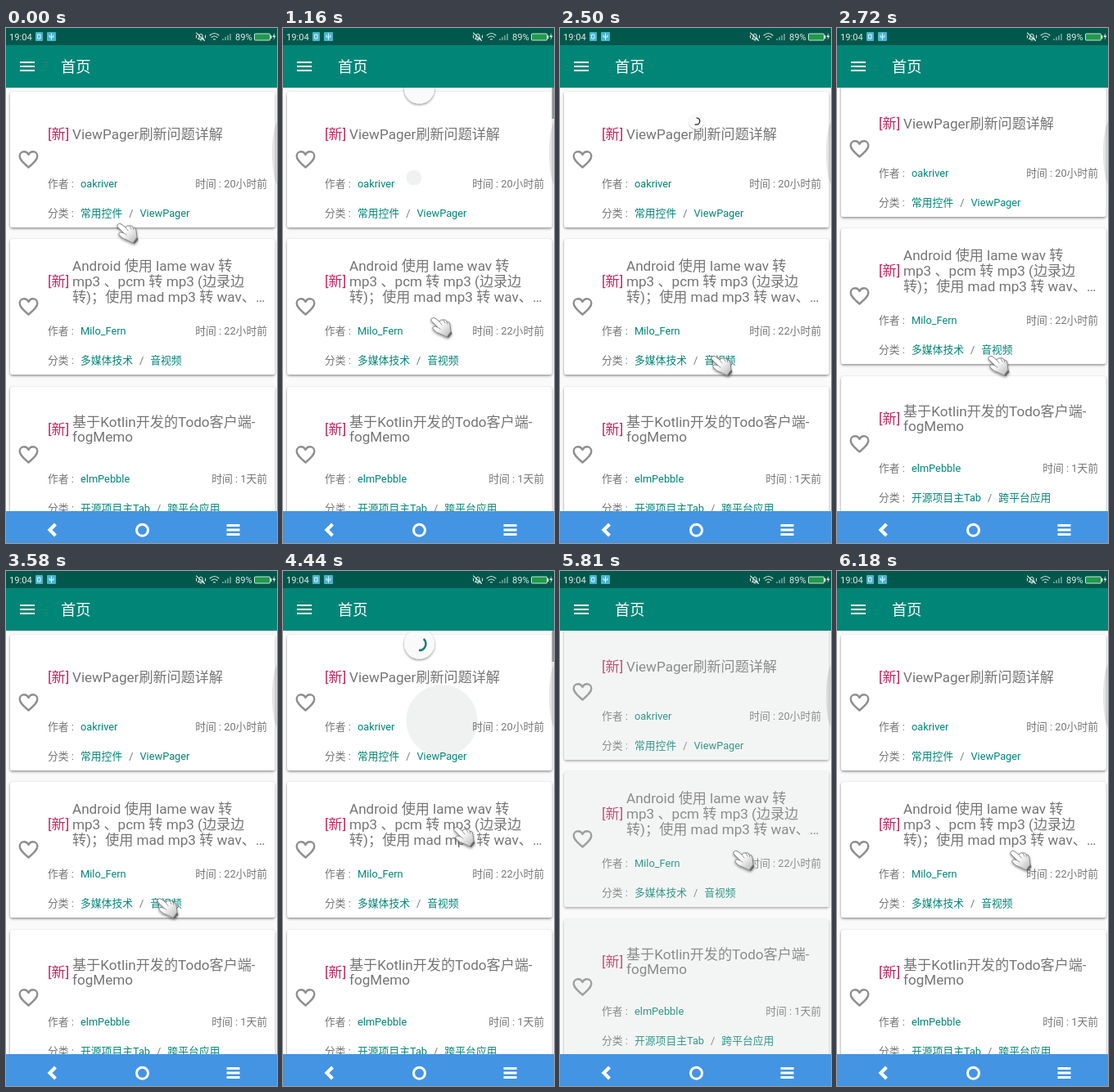
These frames come from a looping animation (331 by 630 pixels, 6570 ms). An HTML page:

```html
<!DOCTYPE html>
<html lang="zh-CN">
<head>
<meta charset="utf-8">
<title>首页</title>
<style>
  html, body { margin: 0; width: 100%; height: 100%; overflow: hidden; background: #fafafa; }
  svg { display: block; width: 100vw; height: 100vh; }
  text { font-family: Roboto, "Noto Sans CJK SC", "Noto Sans CJK", sans-serif; white-space: pre; }
  .title { font-size: 17.1px; fill: #757575; }
  .tag { font-size: 17.1px; fill: #c2285f; }
  .small { font-size: 12.8px; fill: #757575; }
  .link { fill: #008577; }
  .status { font-size: 11.2px; fill: #dceae7; }
  .line { fill: none; stroke-linecap: round; stroke-linejoin: round; }
</style>
</head>
<body>
<svg viewBox="0 0 331 630" preserveAspectRatio="none">
  <defs>
    <filter id="shade" x="-10%" y="-10%" width="120%" height="125%">
      <feDropShadow dx="0" dy="1.4" stdDeviation="1.5" flood-opacity=".46"/>
    </filter>
    <linearGradient id="glove" x1="0" y1="0" x2="1" y2="1">
      <stop offset=".4" stop-color="#fff"/><stop offset="1" stop-color="#b4b4b4"/>
    </linearGradient>
  </defs>
  <rect width="331" height="630" fill="#fafafa"/>
  <g id="list"></g>
  <circle id="ripple" cy="183" fill="#001410"/>
  <rect id="scroll" x="328.5" y="73" width="2.5" height="38" fill="#8f9492"/>
  <ellipse cx="333.5" cy="153" rx="8.5" ry="40" fill="#000" opacity=".1"/>
  <g id="spinner">
    <circle r="18.5" fill="#fafafa" filter="url(#shade)"/>
    <circle id="arc" r="8" class="line" stroke-width="2.5" style="stroke-linecap:butt"/>
  </g>

  <rect width="331" height="73" fill="#008577"/>
  <rect width="331" height="21" fill="#00574b"/>
  <text class="status" x="4" y="15">19:04</text>
  <g fill="#48b5cf">
    <rect x="36" y="5" width="9" height="11" rx="1"/>
    <rect x="50" y="5" width="11" height="11" rx="1"/>
  </g>
  <path class="line" stroke="#e4f4f4" d="M39 8h3v5h-3zM55.500 7v7M53 9v2h5v-2"/>
  <g class="line" stroke="#d5e5e2" stroke-width="1.1">
    <path d="M234.500 13.500h7l-1.500-2v-2.500q-2-3.500-4 0v2.500zM232.500 6l10 9.500M237 15h2M232.500 9v3M243.500 9v3"/>
    <path d="M249 9q5.500-5 11 0M251 11.500q3.500-3 7 0M253.500 14q1-1 2 0"/>
  </g>
  <path stroke="#7fa9a2" stroke-width="1.500" d="M265 15v-2M268 15v-4M271 15v-6M274 15v-8"/>
  <text class="status" x="280" y="15">89%</text>
  <rect x="303.500" y="7" width="19" height="8" rx="1" fill="#1f9a4a" stroke="#cfe2de"/>
  <rect x="323" y="9" width="1.500" height="4" fill="#d8e8e4"/>
  <path d="M328 6l-2.500 5h2l-1 4 3-5.500h-2z" fill="#e4efed"/>
  <path stroke="#fff" stroke-width="1.900" d="M17 42h18M17 47h18M17 52h18"/>
  <text x="67" y="54" font-size="18.300" fill="#fff">首页</text>

  <rect y="591" width="331" height="39" fill="#4394e3"/>
  <g fill="none" stroke="#fff" stroke-width="3">
    <path d="M60.500 607l-7 7 7 7" stroke-width="4.200"/>
    <circle cx="166.500" cy="614.300" r="7"/>
    <path d="M269.500 608.500h16M269.500 614h16M269.500 619.500h16"/>
  </g>

  <g id="hand" filter="url(#shade)">
    <path d="M20 25l5.500-7 1 3-4.500 5z" fill="#666"/>
    <path d="M1 3Q3 0 6 2L11 6Q13 3 16 4Q19 3 20 6Q24 6 24 10L25 18L20 25L14 22Q7 20 3 15Q2 12 6 12L9 13L2 6Q0 4 1 3Z"
          fill="url(#glove)" stroke="#858585" stroke-width="1"/>
    <path class="line" d="M11 6l3 4M16 4l2 4M20 6l1 3M9 13l3 2" stroke="#9a9a9a"/>
  </g>
</svg>
<script>
const LOOP = 6570;
const HEART = "M12 20C5 14 3 11.500 3 8.500C3 6 5 4 7.500 4C9.500 4 11 5 12 7C13 5 14.500 4 16.500 4C19 4 21 6 21 8.500C21 11.500 19 14 12 20Z";
const cards = [
  { title: ["ViewPager刷新问题详解"], author: "oakriver", age: "20小时前", kind: ["常用控件", "ViewPager"] },
  { title: ["Android 使用 lame wav 转", "mp3 、pcm 转 mp3 (边录边", "转)；使用 mad mp3 转 wav、…"],
    author: "Milo_Fern", age: "22小时前", kind: ["多媒体技术", "音视频"] },
  { title: ["基于Kotlin开发的Todo客户端-", "fogMemo"], author: "elmPebble", age: "1天前", kind: ["开源项目主Tab", "跨平台应用"] }
];

// One entry per pull-to-refresh gesture.
const pulls = [
  { x: 160, y: [[1060, 53], [1160, 74], [1560, 114]], tap: 1120, fade: [1590, 1690], bar: [960, 1560], release: 1890, reload: 2520 },
  { x: 194, y: [[4270, 53], [4440, 89], [4790, 114]], tap: 4250, fade: [4820, 4950], bar: [4200, 4790], release: 5200, reload: 5640 }
];
const handX = [[330, 135], [500, 160], [920, 160], [1160, 180], [1560, 184], [3580, 184], [3990, 194], [4160, 194], [4440, 208], [4790, 211]];
const handY = [[330, 238], [500, 183], [920, 183], [1160, 353], [1560, 400], [3580, 400], [3990, 183], [4160, 183], [4440, 312], [4790, 341]];

const $ = id => document.getElementById(id);
const set = (el, attrs) => { for (const k in attrs) el.setAttribute(k, attrs[k]); };
const ramp = (t, a, b) => Math.min(1, Math.max(0, (t - a) / (b - a)));
const ease = p => p * p * (3 - 2 * p);

function track(keys, t) {
  const i = keys.findIndex(k => k[0] > t);
  if (i === 0) return keys[0][1];
  if (i < 0) return keys[keys.length - 1][1];
  const [a, b] = [keys[i - 1], keys[i]];
  return a[1] + (b[1] - a[1]) * ramp(t, a[0], b[0]);
}

function cardMarkup(card, i) {
  const box = `x="5" width="323.500" height="166" rx="3"`;
  const first = 58 - (card.title.length - 1) * 9.4;
  const lines = card.title.map((s, n) => `<text class="title" x="81" y="${first + n * 18.8}">${s}</text>`).join("");
  return `<g transform="translate(0 ${Math.round(78 + i * 180.4)})">
    <rect class="under" ${box} fill="#002a0c"/>
    <g class="card"><rect ${box} fill="#fff" filter="url(#shade)"/>
      <path class="line" d="${HEART}" transform="translate(13.100 68.500) scale(1.200)" stroke="#8f8f8f" stroke-width="2"/>
      <text class="tag" x="51" y="58">[新]</text>${lines}
      <text class="small" x="51" y="117">作者 :</text>
      <text class="small link" x="91" y="117">${card.author}</text>
      <text class="small" x="319" y="117" text-anchor="end">时间 : ${card.age}</text>
      <text class="small" x="51" y="153">分类 :</text>
      <text class="small" x="91" y="153"><tspan class="link">${card.kind[0]}</tspan><tspan dx="8">/</tspan><tspan class="link" dx="8">${card.kind[1]}</tspan></text>
    </g></g>`;
}

const list = $("list"), ripple = $("ripple"), spinner = $("spinner"), arc = $("arc");
list.innerHTML = cards.map(cardMarkup).join("");
const faces = list.querySelectorAll(".card"), unders = list.querySelectorAll(".under");

function drawList(t, r) {
  const alpha = t < r + 75 ? 1 - ramp(t, r, r + 70) : ramp(t, r + 80, r + 200);
  const shift = t < r + 75 ? 0 : -13 * (1 - ease(ramp(t, r + 240, r + 540)));
  set(list, { transform: `translate(0 ${shift})` });
  faces.forEach(el => set(el, { opacity: alpha }));
  unders.forEach(el => set(el, { opacity: .17 * Math.min(1, alpha * 2) }));
}

function drawSpinner(t, p) {
  const y = track(p.y, t), pull = (y - 53) / 61, spin = Math.max(0, t - p.release);
  const scale = 1 - ramp(t, p.reload - 90, p.reload + 60);
  const start = spin ? -8 + spin * .456 : -108 + 100 * pull;
  const sweep = spin ? 135 + 105 * Math.cos(spin * 2 * Math.PI / 712) : 240 * pull;
  const unit = 8 * Math.PI / 180;
  set(spinner, { transform: `translate(166.500 ${y}) scale(${scale})`, visibility: pull > 0 && scale > 0 ? "visible" : "hidden" });
  set(arc, {
    transform: `rotate(${start})`,
    "stroke-dasharray": `${sweep * unit} 60`,
    opacity: ramp(pull, .34, .55),
    stroke: spin > 380 ? "#222" : "#1f7d76"
  });
}

function draw(t) {
  const p = pulls[t < 3500 ? 0 : 1];
  drawList(t, p.reload);
  drawSpinner(t, p);
  set(ripple, { cx: p.x, r: 48 * ramp(t, p.tap, p.tap + 210), opacity: .06 * (1 - ramp(t, ...p.fade)) });
  set($("scroll"), { opacity: t < p.bar[0] ? 0 : 1 - ramp(t, p.bar[1] - 100, p.bar[1]) });
  set($("hand"), { transform: `translate(${track(handX, t)} ${track(handY, t)})` });
}

const begin = performance.now();
function tick() {
  draw((performance.now() - begin) % LOOP);
  requestAnimationFrame(tick);
}
tick();
</script>
</body>
</html>
```
